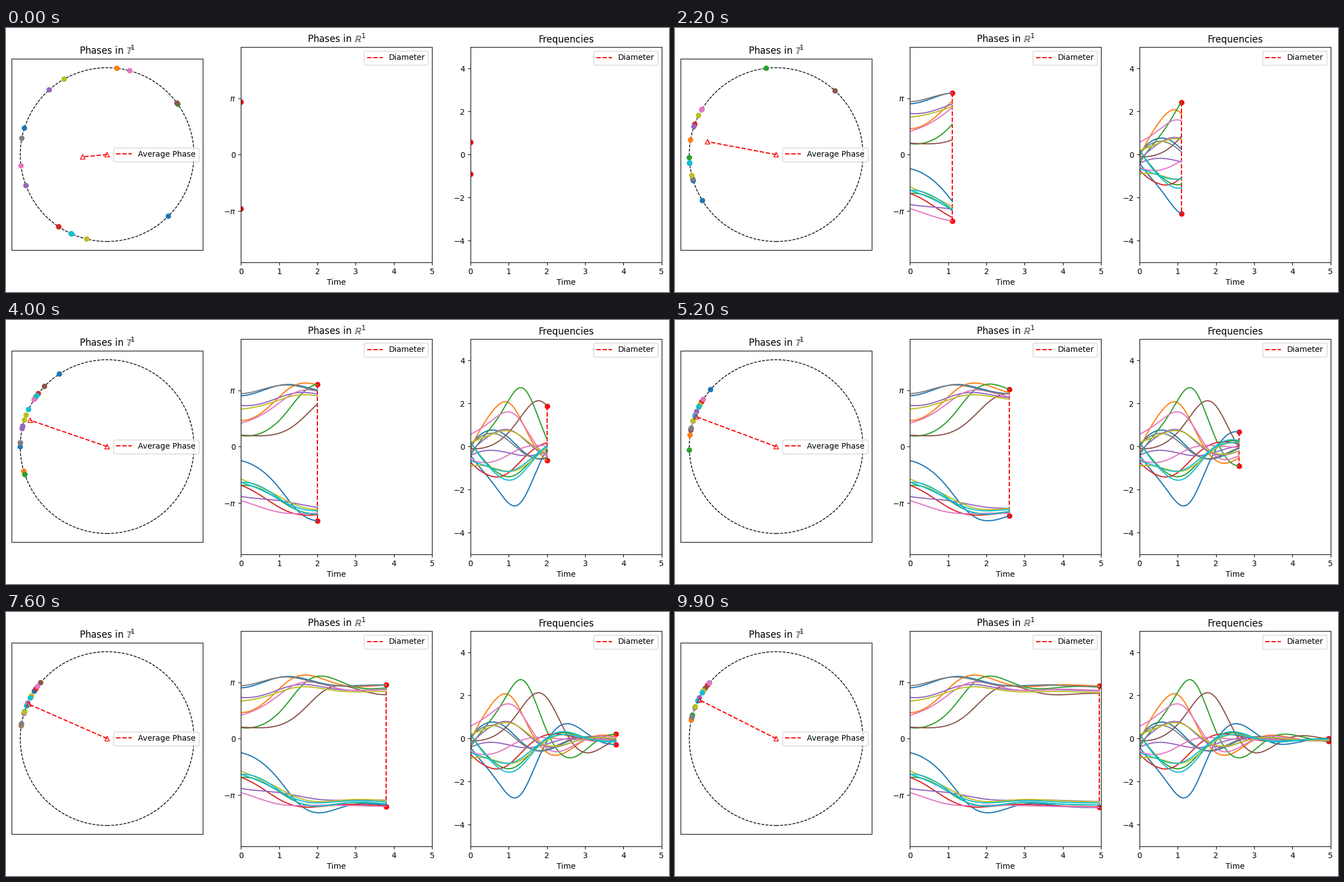
A matplotlib script that plays this animation: 1186 px wide and 472 px high, repeating every 10 s.

```python
import numpy as np
import matplotlib.pyplot as plt
from matplotlib.animation import FuncAnimation

W, H, DPI = 1186, 472, 100
FRAMES, INTERVAL = 100, 100
SUBSTEPS, DT = 5, 0.01
N, COUPLING, MASS = 16, 4.0, 0.5


def simulate():
    """Integrate the Kuramoto model with inertia by RK4."""
    rng = np.random.RandomState(42)
    theta = rng.uniform(-np.pi, np.pi, N)
    omega = rng.uniform(-1, 1, N)
    natural = rng.uniform(-1, 1, N)

    def rate(state):
        th, om = state
        field = np.mean(np.exp(1j * th))
        pull = COUPLING * np.imag(field * np.exp(-1j * th))
        return np.array([om, (natural - om + pull) / MASS])

    state = np.array([theta, omega])
    states = [state]
    for _ in range(FRAMES * SUBSTEPS):
        k1 = rate(state)
        k2 = rate(state + DT / 2 * k1)
        k3 = rate(state + DT / 2 * k2)
        k4 = rate(state + DT * k3)
        state = state + DT / 6 * (k1 + 2 * k2 + 2 * k3 + k4)
        states.append(state)
    states = np.array(states)
    return states[:, 0], states[:, 1]


phases, freqs = simulate()
times = np.arange(len(phases)) * DT
colors = plt.cm.tab10(np.linspace(0, 1, N))

fig = plt.figure(figsize=(W / DPI, H / DPI), dpi=DPI, facecolor="white")

# Panel layout in pixels
LEFT, PITCH, MID = 10.0, 410.45, 226.34
SIDE, TALL = 341.72, 384.95


def add_panel(column, height, title):
    """Axes in one of three columns, centred on the middle line."""
    left, top = LEFT + column * PITCH, MID - height / 2
    ax = fig.add_axes([left / W, 1 - (top + height) / H, SIDE / W, height / H])
    ax.set_title(title)
    return ax


class History:
    """Growing curves with a dashed line between the extremes."""

    def __init__(self, ax, data, limit):
        self.data = data
        ax.set(xlim=(0, 5), ylim=(-limit, limit), xlabel="Time")
        self.ends = ax.scatter([0, 0], [0, 0], color="r")
        self.span, = ax.plot([], [], "r--", label="Diameter")
        self.curves = [ax.plot([], [], color=c)[0] for c in colors]
        ax.legend(loc="upper right")

    def show(self, k):
        for curve, values in zip(self.curves, self.data.T):
            curve.set_data(times[:k + 1], values[:k + 1])
        x = [times[k]] * 2
        y = [self.data[k].max(), self.data[k].min()]
        self.span.set_data(x, y)
        self.ends.set_offsets(np.column_stack([x, y]))


circle_ax = add_panel(0, SIDE, r"Phases in $\mathbb{T}^1$")
phase_ax = add_panel(1, TALL, r"Phases in $\mathbb{R}^1$")
freq_ax = add_panel(2, TALL, "Frequencies")

circle_ax.set(xlim=(-1.1, 1.1), ylim=(-1.1, 1.1), xticks=[], yticks=[])
circle_ax.add_patch(plt.Circle((0, 0), 1, fill=False, ls="--", lw=1))
dots = circle_ax.scatter(np.cos(phases[0]), np.sin(phases[0]), c=colors)
mean_line, = circle_ax.plot([], [], "r--", label="Average Phase")
mean_ends = circle_ax.scatter([0, 0], [0, 0], marker="^", facecolors="none",
                              edgecolors="r", linewidths=1)
circle_ax.legend(loc="center right")

histories = [History(phase_ax, phases, 6), History(freq_ax, freqs, 5)]
phase_ax.set_yticks([-np.pi, 0, np.pi], [r"$-\pi$", "0", r"$\pi$"])
freq_ax.set_yticks([-4, -2, 0, 2, 4])


def update(frame):
    k = frame * SUBSTEPS
    points = np.column_stack([np.cos(phases[k]), np.sin(phases[k])])
    dots.set_offsets(points)
    ends = np.array([(0, 0), points.mean(axis=0)])
    mean_line.set_data(*ends.T)
    mean_ends.set_offsets(ends)
    for history in histories:
        history.show(k)
    return []


anim = FuncAnimation(fig, update, frames=FRAMES, interval=INTERVAL,
                     repeat=True, repeat_delay=0)
plt.show()
```
